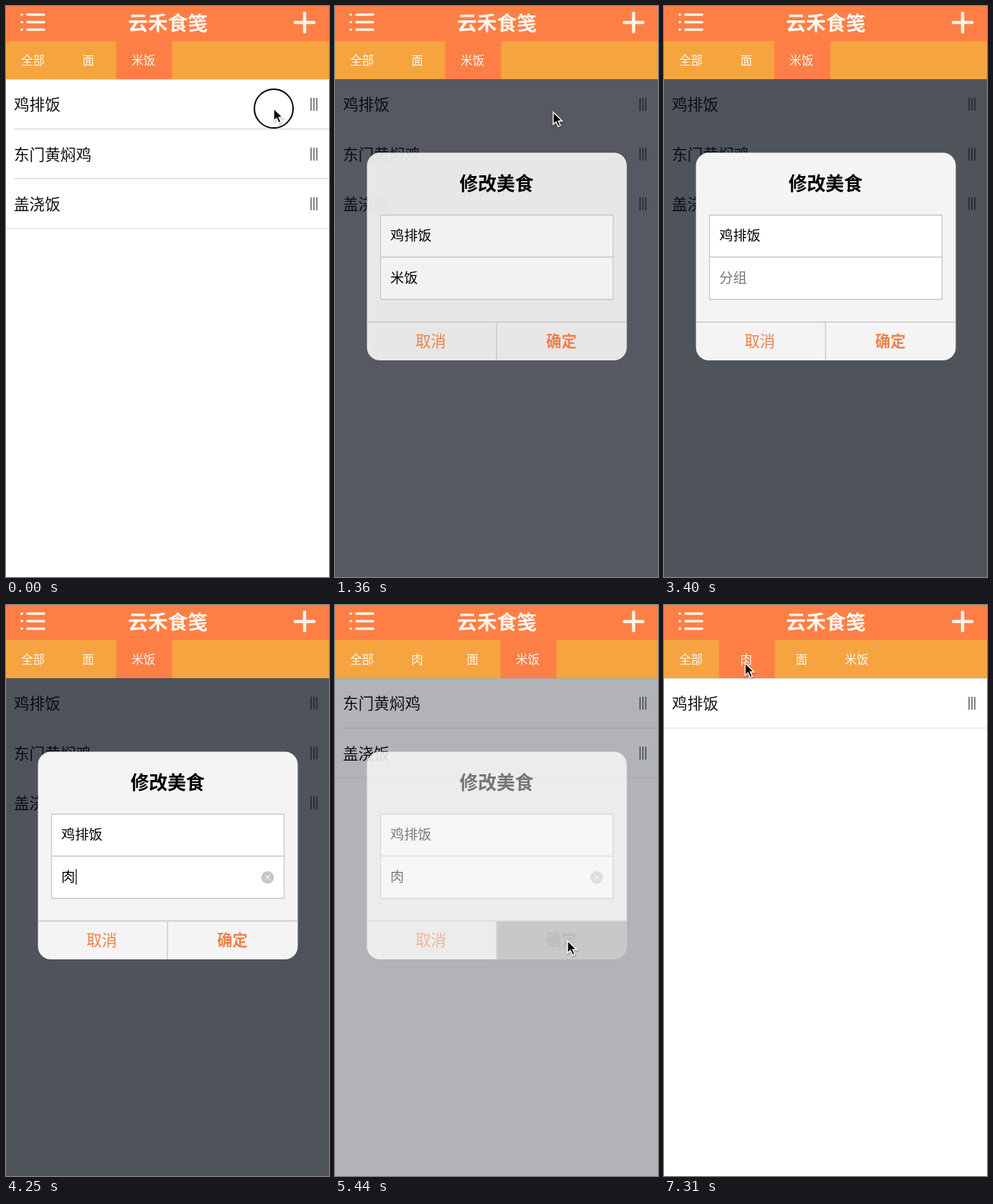
These frames come from a looping animation (450x796 px, 7480 ms). An HTML page:

```html
<!DOCTYPE html>
<html lang="zh-CN">
<head>
<meta charset="utf-8">
<title>菜单列表</title>
<style>
  html, body { margin: 0; width: 100%; height: 100%; overflow: hidden; background: #fff; }
  svg { display: block; width: 100vw; height: 100vh; }
  text { font-family: "Noto Sans CJK SC", "Noto Sans CJK", sans-serif; }
</style>
</head>
<body>
<svg id="stage" viewBox="0 0 450 796"></svg>
<script>
const STEP = 170, LOOP = 7480;
const ORANGE = '#fd7f46', AMBER = '#f6a440', TAB = 77;
const stage = document.getElementById('stage');

// [ms, x, y] of the pointer tip
const pointerPath = [
  [0, 373, 143], [170, 373, 143], [680, 300, 144], [1360, 304, 148],
  [1870, 310, 376], [2210, 310, 376], [2550, 364, 379], [2890, 364, 379],
  [4420, 364, 379], [5100, 324, 468], [5440, 324, 468],
  [6290, 228, 247], [6800, 113, 81], [LOOP, 113, 81]
];
// [ms, backdrop, panel, content] opacities of the dialog
const fades = [
  [0, 0, 0, 0], [1190, 0, 0, 0], [1360, .966, .92, 1], [1530, 1, 1, 1],
  [5100, 1, 1, 1], [5270, .85, .97, .88], [5440, .44, .88, .5],
  [5610, .1, .3, .1], [5780, 0, 0, 0], [LOOP, 0, 0, 0]
];
const presses = [[0, 680], [1870, 2040], [2720, 2890], [5100, 5270], [6800, 6970]];

const between = (t, from, to) => t >= from && t < to;

function sample(keys, t, ease = k => k) {
  const i = keys.findIndex((key, n) => t < keys[n + 1][0]);
  const a = keys[i], b = keys[i + 1];
  const k = ease((t - a[0]) / (b[0] - a[0]));
  return a.slice(1).map((v, n) => v + (b[n + 1] - v) * k);
}

const rect = (x, y, w, h, fill, extra = '') =>
  `<rect x="${x}" y="${y}" width="${w}" height="${h}" fill="${fill}" ${extra}/>`;

const path = (d, color, width, extra = '') =>
  `<path d="${d}" fill="none" stroke="${color}" stroke-width="${width}" ${extra}/>`;

// y is the vertical centre of the glyphs
const label = (s, x, y, size, fill, weight = 400, anchor = 'start') =>
  `<text x="${x}" y="${y + size * .38}" font-size="${size}" fill="${fill}" ` +
  `font-weight="${weight}" text-anchor="${anchor}">${s}</text>`;

function header(tabs, selected) {
  const round = 'stroke-linecap="round"';
  return rect(0, 0, 450, 50, ORANGE) + rect(0, 49, 450, 53, AMBER) +
    rect(selected * TAB - .5, 49, TAB + 1, 53, ORANGE) +
    path('M22 12h.1M22 22.5h.1M22 33h.1M30 12h23M30 22.5h23M30 33h23', '#fff3e9', 3.6, round) +
    path('M403 23h26M416 10v26', '#fff3e9', 4.6, round) +
    label('云禾食笺', 225.5, 23, 27.8, '#fff8f0', 700, 'middle') +
    tabs.map((s, i) => label(s, 37.5 + i * TAB, 76, 16.6, '#fff8f0', 500, 'middle')).join('');
}

function list(rows, lineOpacity) {
  const lines = rows.map((_, i) => {
    const last = i === rows.length - 1;
    return path(`M${last ? 0 : 11} ${171.5 + i * 69.2}H450`, last ? '#ddd' : '#ccc', 1);
  });
  return `<g opacity="${lineOpacity}">${path('M0 102.5H450', '#ddd', 1)}${lines.join('')}</g>` +
    rows.map((s, i) => {
      const y = 137 + i * 69.4;
      return label(s, 11, y, 21.6, '#101114') +
        path(`M425 ${y - 9}v18M429 ${y - 9}v18M433 ${y - 9}v18`, '#303236', 1.2);
    }).join('');
}

function dialog(t, panel, content) {
  const focused = between(t, 2040, 5780);
  const group = t < 2890 ? '米饭' : t < 4080 ? '' : '肉';
  const pressed = t >= 5270;
  const caretOn = (t / STEP + 1) % 6 < 3 && t < 5270;
  const line = '#c6c6c6';
  let inside = '';
  if (pressed) inside += rect(225, 441, 182, 54, '#a3a3a3');
  inside += path('M63.5 291.5H387.5V409H63.5ZM63.5 350H387.5M44 440.5H407M225 440.5V495', line, 1.3) +
    label('修改美食', 225, 247, 25.8, '#000', 700, 'middle') +
    label('鸡排饭', 77, 320, 19.2, '#000') +
    label(group || '分组', 77, 379, 19.2, group ? '#000' : '#777') +
    label('取消', 133.5, 467, 21.2, '#f08048', 400, 'middle') +
    label('确定', 315.5, 467, 21.2, pressed ? '#888' : '#f08048', 700, 'middle');
  if (focused && group) {
    inside += '<circle cx="364.5" cy="379.7" r="8.8" fill="#c6c6c6"/>' +
      path('M361.3 376.5l6.4 6.4M367.7 376.5l-6.4 6.4', '#f4f4f4', 1.2);
  }
  if (focused && caretOn) inside += rect(78 + group.length * 19, 368, 1.5, 22, '#30343c');
  return '<clipPath id="panel"><rect x="44.5" y="204.5" width="362" height="289.5" rx="18"/></clipPath>' +
    `<g clip-path="url(#panel)"><g opacity="${panel}">` +
    rect(44, 204, 363, 291, '#f4f4f4') + rect(63.5, 291.5, 324, 117.5, '#fff') +
    `</g><g opacity="${content}">${inside}</g></g>`;
}

function pointer(t) {
  if (between(t, 3060, 4420)) return '';
  const [x, y] = sample(pointerPath, t, k => k * k * (3 - 2 * k));
  const arrow = 'M0 0V17L4 13.4L7 20L10 18.7L7.2 12.2H12.5Z';
  const ring = presses.some(p => between(t, ...p))
    ? '<circle r="27" fill="none" stroke="#000" stroke-width="2"/>' : '';
  return `<g transform="translate(${x} ${y})">${ring}` +
    `<path d="${arrow}" transform="translate(1 2)" stroke="#000" stroke-width="3" opacity=".12"/>` +
    `<path d="${arrow}" stroke="#fff" stroke-width="1.4"/></g>`;
}

function draw(t) {
  const [dim, panel, content] = sample(fades, t);
  const moved = t >= 5270, switched = t >= 6970;
  const tabs = moved ? ['全部', '肉', '面', '米饭'] : ['全部', '面', '米饭'];
  const rows = switched ? ['鸡排饭'] : ['东门黄焖鸡', '盖浇饭'];
  if (!moved) rows.unshift('鸡排饭');
  stage.innerHTML = rect(0, 0, 450, 796, '#fff') + list(rows, 1 - dim) +
    (dim ? rect(0, 102, 450, 694, '#050a15', `opacity="${dim * .7}"`) : '') +
    header(tabs, switched ? 1 : tabs.length - 1) +
    (panel ? dialog(t, panel, content) : '') + pointer(t);
}

const start = performance.now();
let shown = -1;
function tick() {
  const time = (performance.now() - start) % LOOP;
  const t = Math.floor(time / STEP) * STEP;
  if (t !== shown) draw(shown = t);
  requestAnimationFrame(tick);
}
tick();
</script>
</body>
</html>
```
